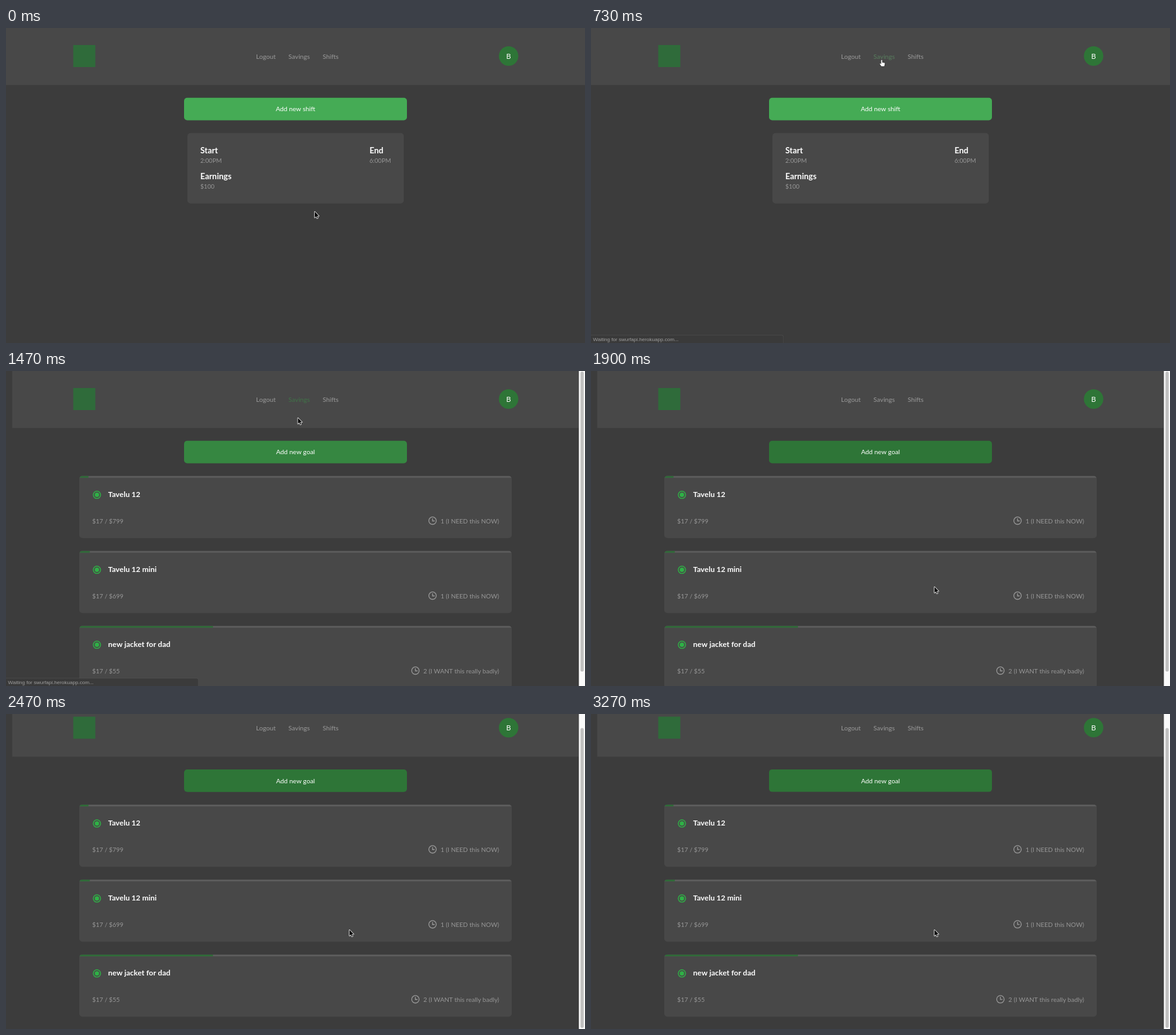
These frames come from a looping animation (917 px wide and 500 px high, 4760 ms). An HTML page with a canvas:

```html
<!DOCTYPE html>
<html lang="en">
<head>
<meta charset="utf-8">
<title>Savings tracker</title>
<style>
html, body { margin: 0; width: 100%; height: 100%; overflow: hidden; background: #3c3c3c; }
canvas { display: block; width: 917px; height: 500px; }
</style>
</head>
<body>
<canvas id="stage"></canvas>
<script>
const W = 917, H = 500, LOOP = 4760, PAGE_SWITCH = 1400;
const canvas = document.getElementById('stage');
const dpr = window.devicePixelRatio || 1;
canvas.width = W * dpr;
canvas.height = H * dpr;
const ctx = canvas.getContext('2d');

const PANEL = '#484848', MUTED = '#979797', WHITE = '#ffffff';
const BRIGHT = [69, 171, 85], DEEP = [46, 117, 55];
const LINK = [154, 154, 154], LINK_HOVER = [46, 107, 55];

const goals = [
  { name: 'Tavelu 12', price: 799, need: '1 (I NEED this NOW)' },
  { name: 'Tavelu 12 mini', price: 699, need: '1 (I NEED this NOW)' },
  { name: 'new jacket for dad', price: 55, need: '2 (I WANT this really badly)' }
];

const clamp = v => Math.min(1, Math.max(0, v));
const span = (t, a, b) => clamp((t - a) / (b - a));
const lerp = (a, b, k) => a + (b - a) * k;
const mix = (a, b, k) => `rgb(${a.map((v, i) => Math.round(lerp(v, b[i], k))).join(',')})`;
const smooth = k => k * k * (3 - 2 * k);

// Linear interpolation through [time, value] pairs
function track(t, keys) {
  if (t <= keys[0][0]) return keys[0][1];
  for (let i = 1; i < keys.length; i++) {
    const [t0, v0] = keys[i - 1], [t1, v1] = keys[i];
    if (t <= t1) return lerp(v0, v1, (t - t0) / (t1 - t0));
  }
  return keys[keys.length - 1][1];
}

function box(x, y, w, h, r, color) {
  ctx.fillStyle = color;
  ctx.beginPath();
  ctx.roundRect(x, y, w, h, r);
  ctx.fill();
}

function disc(x, y, r, color) {
  ctx.fillStyle = color;
  ctx.beginPath();
  ctx.arc(x, y, r, 0, 7);
  ctx.fill();
}

function ring(x, y, r, width, color) {
  ctx.strokeStyle = color;
  ctx.lineWidth = width;
  ctx.beginPath();
  ctx.arc(x, y, r, 0, 7);
  ctx.stroke();
}

function text(str, x, y, size, color, align = 'left', weight = 400, family = 'Lato') {
  ctx.font = `${weight} ${size}px ${family}, sans-serif`;
  ctx.textAlign = align;
  ctx.fillStyle = color;
  ctx.fillText(str, x, y);
}

function header(left, right, hover) {
  ctx.fillStyle = PANEL;
  ctx.fillRect(left, 0, right - left, 90.5);
  ctx.fillStyle = '#2f6b3a';
  ctx.fillRect(106.5, 27, 35, 35);
  const link = mix(LINK, LINK_HOVER, 0);
  text('Logout', 396, 48.6, 10.3, link);
  text('Savings', 447.3, 48.6, 10.3, mix(LINK, LINK_HOVER, hover));
  text('Shifts', 501.5, 48.6, 10.3, link);
  disc(796, 44.5, 15.4, mix(DEEP, DEEP, 0));
  text('B', 796, 48.8, 11.5, WHITE, 'center');
}

function button(label, fade) {
  box(282, 110.7, 353, 35.7, 5, mix(BRIGHT, DEEP, fade));
  text(label, 458.5, 132.4, 10.3, WHITE, 'center');
}

function shiftCard() {
  box(287.3, 166.7, 342.7, 111.8, 5, PANEL);
  const field = (label, value, x, y) => {
    text(label, x, y, 13, WHITE, 'left', 700);
    text(value, x, y + 14.8, 9.7, MUTED);
  };
  field('Start', '2:00PM', 307.7, 199.4);
  field('End', '6:00PM', 575.7, 199.4);
  field('Earnings', '$100', 307.7, 240.2);
}

function goalCard({ name, price, need }, y) {
  box(116, y, 685, 98.7, 5, PANEL);
  ctx.save();
  ctx.beginPath();
  ctx.roundRect(116, y, 685, 98.7, 5);
  ctx.clip();
  ctx.fillStyle = '#5d5d5d';
  ctx.fillRect(116, y, 685, 2.8);
  ctx.fillStyle = '#2e6b37';
  ctx.fillRect(116, y, 685 * 17 / price, 2.8);
  ctx.restore();

  ring(144, y + 30, 5.8, 1.4, '#2fb146');
  disc(144, y + 30, 3.5, '#2fb146');
  text(name, 161.8, y + 33.6, 12, WHITE, 'left', 700);
  text('$17 / $' + price, 136.6, y + 75, 9.8, MUTED);
  text(need, 781, y + 75, 10, MUTED, 'right');

  const cx = 781 - ctx.measureText(need).width - 12.7, cy = y + 71;
  ring(cx, cy, 5.9, 1.3, MUTED);
  ctx.beginPath();
  ctx.moveTo(cx, cy - 3.7);
  ctx.lineTo(cx, cy + 0.4);
  ctx.lineTo(cx + 3.3, cy + 0.4);
  ctx.stroke();
}

function scrollbar(scroll) {
  ctx.fillStyle = '#fafafa';
  ctx.fillRect(907.3, 0, 9.7, H);
  box(909.8, 1 + Math.min(scroll, 22.8) * 0.93, 5.2, 476, 2.6, '#c1c1c1');
}

function statusBar(alpha) {
  if (alpha <= 0) return;
  ctx.globalAlpha = alpha;
  box(-1, 487.3, 306, 14, [0, 3, 0, 0], '#525252');
  box(-1, 488, 305.4, 14, [0, 3, 0, 0], '#323232');
  text('Waiting for swurfapi.herokuapp.com...', 3.3, 496.8, 8.1, '#d2d2d2', 'left', 400, '"Liberation Sans"');
  ctx.globalAlpha = 1;
}

function cursor(x, y, hand) {
  const arrow = new Path2D('M0 0V9.4L2.2 7.4 3.6 10.6 5 10 3.7 6.9H6.6Z');
  const pointer = new Path2D('M-.9.6Q0-.5.9.6V4.2L4.2 4.7Q5.2 5 5 6.4L4.1 10.3H-.5L-3 6.7Q-3.1 5.4-1.9 5.8L-.9 6.7Z');
  const shape = hand ? pointer : arrow;
  ctx.save();
  ctx.translate(x, y);
  ctx.lineJoin = 'round';
  ctx.lineWidth = hand ? 0.9 : 1.5;
  ctx.strokeStyle = hand ? '#111' : '#f4f4f4';
  ctx.fillStyle = hand ? '#fff' : '#0a0a0a';
  ctx.stroke(shape);
  ctx.fill(shape);
  ctx.restore();
}

function cursorAt(t) {
  if (t < 550) {
    const k = 1 - (1 - span(t, 0, 533)) ** 2.25;
    return [lerp(489, 452.5, k), lerp(291.5, 51.5, k)];
  }
  if (t < PAGE_SWITCH - 30) {
    const k = span(t, 550, 1067);
    return [lerp(452.5, 454.5, k) + 8 * Math.sin(Math.PI * k), lerp(51.5, 48.7, k)];
  }
  const k = smooth(span(t, PAGE_SWITCH - 30, 1900));
  return [lerp(454.5, 544, k), lerp(48.7, 342.7, k)];
}

function draw(t) {
  const savings = t >= PAGE_SWITCH;
  const hover = savings ? 1 - span(t, 1430, 1650) : span(t, 550, 850);
  const fade = track(t, [[1067, 0], [1100, 0.24], [1133, 0.5], [1370, 0.5], [1650, 1]]);
  const scroll = track(t, [[2333, 0], [2467, 22.8], [2700, 25.4], [3033, 25.4], [3267, 22.8]]);

  ctx.setTransform(dpr, 0, 0, dpr, 0, 0);
  ctx.fillStyle = '#3c3c3c';
  ctx.fillRect(0, 0, W, H);

  ctx.save();
  if (savings) {
    ctx.translate(0, -scroll);
    header(9.7, 907.3, hover);
    button('Add new goal', fade);
    goals.forEach((goal, i) => goalCard(goal, 166.6 + 119 * i));
  } else {
    header(0, W, hover);
    button('Add new shift', fade);
    shiftCard();
  }
  ctx.restore();

  if (savings) scrollbar(scroll);
  statusBar(savings ? 1 - span(t, 1400, 1600) : span(t, 600, 800));
  const [x, y] = cursorAt(t);
  cursor(x, y, t >= 550 && t < 1450);
}

const start = performance.now();
function tick() {
  const t = (performance.now() - start) % LOOP;
  draw(Math.floor((t + 4) * 0.03) / 0.03);
  requestAnimationFrame(tick);
}
tick();
</script>
</body>
</html>
```
